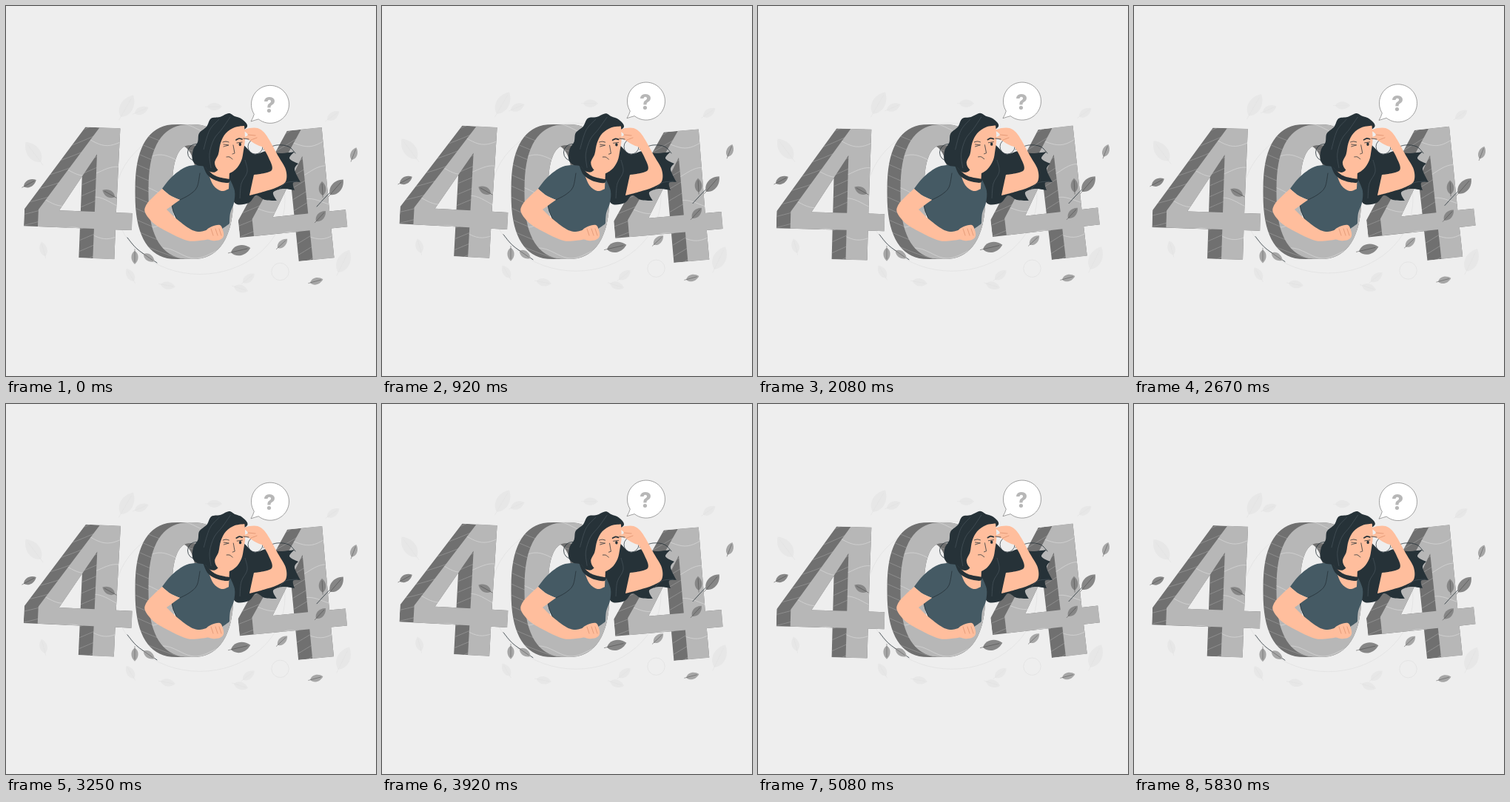
Write an HTML page that moves like this. It is 500 px wide and 500 px high and loops after 5.87 s.

```html
<!DOCTYPE html>
<html lang="en">
<head>
<meta charset="utf-8">
<title>404</title>
<style>
html, body { margin: 0; width: 100%; height: 100%; overflow: hidden; background: #eee; }
svg { display: block; width: 100vw; height: 100vh; }
.front { fill: #b7b7b7; fill-rule: evenodd; }
.side { fill: #707070; }
.wave { fill: none; stroke: #dcdcdc; stroke-width: .6; }
.hatch { fill: none; stroke: #a0a0a0; stroke-width: .6; }
.skin { fill: #ffbe9d; }
.hair { fill: #263238; }
.shirt { fill: #455a64; }
.ink { fill: none; stroke: #263238; stroke-width: .8; stroke-linecap: round; }
.brow { stroke-width: 1.7; }
.fold { fill: none; stroke: #d98c68; stroke-width: .7; stroke-linecap: round; }
.shine { fill: none; stroke: #56636a; stroke-width: .5; }
.faint { fill: none; stroke: #e0e0e0; stroke-width: .7; }
.mark { font: 800 28px Inter, "Open Sans", sans-serif; fill: #b7b7b7; text-anchor: middle; }
</style>
</head>
<body>
<svg viewBox="0 0 500 500"></svg>
<script>
const svg = document.querySelector('svg');

function add(parent, tag, attrs = {}) {
  const node = document.createElementNS('http://www.w3.org/2000/svg', tag);
  for (const key in attrs) node.setAttribute(key, attrs[key]);
  parent.append(node);
  return node;
}
const group = (parent, attrs) => add(parent, 'g', attrs);
const draw = (parent, cls, d) => add(parent, 'path', { class: cls, d });
const ring = (parent, cls, cx, cy, rx, ry = rx) => add(parent, 'ellipse', { class: cls, cx, cy, rx, ry });

// Smooth path through "x,y" points; a "!" makes a sharp corner.
function smooth(text, closed = true) {
  const pts = text.split(' ').map(s => ({ p: s.replace('!', '').split(',').map(Number), sharp: s.endsWith('!') }));
  const n = pts.length;
  const at = i => closed ? pts[(i + n) % n] : pts[Math.max(0, Math.min(n - 1, i))];
  const handle = (i, dir) => at(i).p.map((v, k) =>
    at(i).sharp ? v : v + dir * (at(i + 1).p[k] - at(i - 1).p[k]) / 6);
  let d = 'M' + pts[0].p;
  for (let i = 0; i < (closed ? n : n - 1); i++) d += `C${handle(i, 1)} ${handle(i + 1, -1)} ${at(i + 1).p}`;
  return closed ? d + 'Z' : d;
}
const blob = (parent, cls, text) => draw(parent, cls, smooth(text));
const line = (parent, cls, text) => draw(parent, cls, smooth(text, false));

// Extruded, patterned numerals
function oval(rx, ry, power = 2.5) {
  const bend = v => Math.sign(v) * Math.abs(v) ** (2 / power);
  const pts = Array.from({ length: 72 }, (_, i) => {
    const a = i * Math.PI / 36;
    return [rx * bend(Math.cos(a)), ry * bend(Math.sin(a))];
  });
  return 'M' + pts.join('L') + 'Z';
}

function curves(top, left, gap, shape) {
  let d = '';
  for (let row = 0; row < 16; row++) {
    for (let x = 0; x <= 160; x += 4) d += `${x ? 'L' : 'M'}${left + x} ${top + row * gap + shape(x, row)}`;
  }
  return d;
}

let clips = 0;
function clipped(parent, d, shifts) {
  const id = 'clip' + clips++;
  const clip = add(parent, 'clipPath', { id });
  shifts.forEach(x => add(clip, 'path', { d, 'clip-rule': 'evenodd', transform: `translate(${-x} 0)` }));
  return group(parent, { 'clip-path': `url(#${id})` });
}

function numeral(parent, d, transform, depth, top, left, slope) {
  const root = group(parent, { transform });
  const steps = Array.from({ length: depth * 2 + 1 }, (_, i) => i / 2);
  const side = clipped(root, d, steps);
  add(side, 'rect', { class: 'side', x: -120, y: -160, width: 300, height: 300 });
  draw(side, 'hatch', curves(top, left, 15, x => x * slope + 3 * Math.sin(x / 30)));
  draw(root, 'front', d);
  draw(clipped(root, d, [0]), 'wave', curves(top, left, 42, (x, row) => 7 * Math.sin(x / 14 + row * 2)));
}

const four = 'M78-137H106L105-23H127V0H105V40H76V0H0V-23ZM76-101L28-23H76Z';
const zero = oval(57.5, 91) + oval(25.5, 63);

// Leaves: base point, heading in degrees, length
function leaf(parent, x, y, turn, len, fill, vein) {
  const g = group(parent, { transform: `translate(${x} ${y}) rotate(${turn}) scale(${len})` });
  add(g, 'path', { d: 'M0 0C.2-.34.7-.34 1 0C.7.34.2.34 0 0Z', fill });
  add(g, 'path', { d: 'M-.15 0H.85', stroke: vein, 'stroke-width': .5 / len });
}
const scatter = (parent, spots, len, fill, vein) =>
  spots.forEach(([x, y, turn]) => leaf(parent, x, y, turn, len, fill, vein));

const backdrop = group(svg);
ring(backdrop, 'faint', 262, 262.5, 115, 100);
ring(backdrop, 'faint', 370.5, 359, 11.7);
scatter(backdrop, [[155, 150, -60], [47, 211, -127], [449, 360, -64]], 34, '#e7e7e7', '#e0e0e0');
scatter(backdrop, [[174, 145, -23], [53, 338, -105], [173, 372, -121], [209, 376, 10],
  [308, 379, 18], [320, 374, -38], [434, 154, -35], [272, 136, 0]], 20, '#e7e7e7', '#e0e0e0');

const sway = group(svg);
numeral(sway, four, 'translate(43 298) rotate(2.3)', 19, -120, -22, -.38);
numeral(sway, four, 'translate(335 311) rotate(-5.8)', 19, -120, -22, -.38);
numeral(svg, zero, 'translate(250 251)', 18, -85, -80, .35);

// Flowing hair, raised arm, torso, resting arm
ring(svg, 'ink', 257, 198, 11.5);
blob(svg, 'hair', '318,187 335,200 352,196 370,199 390,197! 383,206 395,213! 390,221 398,238! 388,239 390,249! 374,247 361,252 366,263! 350,262 338,256 328,266 312,268 305,258 304,243 298,225 308,205');
line(svg, 'ink', '348,194 366,188 382,190 391,199');
line(svg, 'shine', '323,208 326,224 318,240 316,260');
line(svg, 'shine', '368,249 378,239 394,237');
add(svg, 'circle', { cx: 337, cy: 190, r: 10, fill: '#eee', stroke: '#263238', 'stroke-width': .7 });
blob(svg, 'skin', '329,256! 335,228! 359,222 354,203 346,190! 357,183! 368,203 378,221 378,237 366,245 348,251');

blob(svg, 'shirt', '240,219 255,215 271,216! 288,230! 303,235! 309,250 308,266 303,280 302,294! 288,303 270,306 250,304 232,291! 226,278 223,264! 235,262! 222,256 211,247! 223,232');
line(svg, 'ink', '235,262 248,255 258,245 262,226');
line(svg, 'ink', '223,263 226,277 232,291');
blob(svg, 'skin', '211,247! 200,257 190,268 188,279 200,294 222,307 245,317 262,317 276,315! 273,302! 262,305 250,302 232,289 217,275! 235,262! 222,256');
blob(svg, 'skin', '270,304 278,298 289,296 293,303 294,311 289,316 279,317 270,313');
for (const x of [277, 283, 288]) line(svg, 'fold', `${x},301 ${x + 3},310`);

const head = group(svg);
blob(svg, 'skin', '284,208! 273,225! 280,242 291,250 301,247! 302,224!');
svg.append(head);
blob(head, 'hair', '326,163 319,153 309,149 301,145 289,150 277,152 271,163 261,172 259,184 253,194 252,208 258,215 268,217 276,224 286,222 300,200 312,175');
blob(head, 'hair', '266,214! 282,229 303,234! 300,239 284,236 272,228');
blob(head, 'skin', '322,162! 309,164 297,172 290,185 287,200 282,212 287,222 298,227 310,221 318,209 321,195 323,180');
line(head, 'shine', '303,150 292,166 281,180 275,200 277,219');
line(head, 'shine', '288,153 275,168 267,194');
line(head, 'ink', '293,184 297,183 301,184');
line(head, 'ink', '294,187 301,188! 294,190');
line(head, 'ink', '307,188 309,199! 306,200');
line(head, 'ink', '298,204 302,204 306,207');
line(head, 'ink brow', '311,181 315,179 319,180');
line(head, 'ink', '312,185 319,184');
ring(head, 'hair', 316.3, 187, 1.7, 2.2);

blob(svg, 'skin', '320,168! 329,165 340,165 349,171 357,183! 354,189 346,190 338,187 328,181 320,178! 327,174');
line(svg, 'ink', '321,179 328,180');
line(svg, 'fold', '327,174 337,175');
line(svg, 'fold', '331,181 339,178');

const foliage = group(svg);
add(foliage, 'path', {
  d: 'M335.3 146.3A25.5 25.5 0 1 1 341.2 152.9Q337 154 331 156Q334 151 335.3 146.3Z',
  fill: '#fff', stroke: '#666', 'stroke-width': .6
});
add(foliage, 'text', { class: 'mark', x: 356, y: 144 }).textContent = '?';
line(foliage, 'ink', '164,313 178,329 204,347');
line(foliage, 'ink', '420,271 432,258 443,247');
scatter(foliage, [[304, 333, -13], [438, 255, -49]], 27, '#868686', '#484848');
scatter(foliage, [[147, 258, -151], [428, 256, -93], [419, 291, -47], [24, 244, -28]], 19, '#868686', '#484848');
scatter(foliage, [[467, 208, -69], [411, 374, -15], [367, 327, -43], [174, 331, 90], [186, 335, 35]], 18, '#a6a6a6', '#555');

// Triangle wave: 0 at 0, 1 at a quarter, -1 at three quarters.
const swing = p => p < .25 ? p * 4 : p < .75 ? 2 - p * 4 : p * 4 - 4;
const LOOP = 5870, PERIOD = 3000;

function tick() {
  const p = performance.now() % LOOP % PERIOD / PERIOD;
  const lift = `translate(0 ${-7 * (1 - Math.abs(1 - 2 * p))})`;
  backdrop.setAttribute('transform', lift);
  foliage.setAttribute('transform', lift);
  sway.setAttribute('transform', `rotate(${swing(p)} 250 250)`);
  head.setAttribute('transform', `rotate(${swing(p)} 290 230)`);
  requestAnimationFrame(tick);
}
tick();
</script>
</body>
</html>
```
